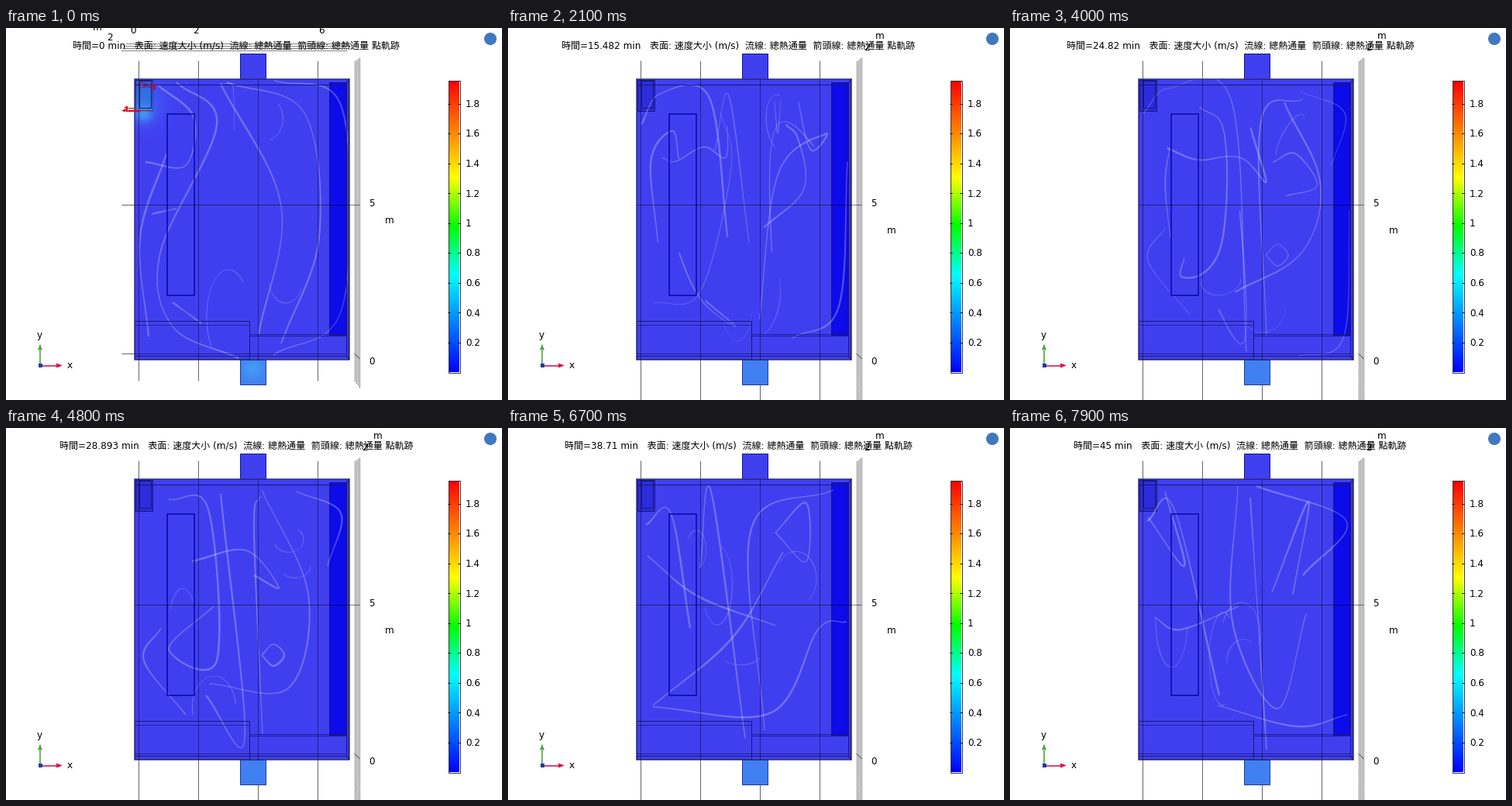
Animation of 640x480 px, one loop 8 s. Source, as a matplotlib script:

```python
import numpy as np
import matplotlib.pyplot as plt
from matplotlib.animation import FuncAnimation
from matplotlib.collections import PolyCollection
from matplotlib.patches import Rectangle, Circle

plt.rcParams["font.family"] = ["DejaVu Sans", "Noto Sans CJK JP"]
PX = 0.9  # points per pixel at 80 dpi
FRAMES, INTERVAL = 80, 100
SAMPLES = 90
NAVY, ROOM, GREY = "#16167c", "#403ff0", "#666666"
LEFT, TOP, RIGHT, BOTTOM = 165.5, 65.5, 443, 428
rng = np.random.default_rng(5)

fig = plt.figure(figsize=(8, 6), dpi=80, facecolor="white")
ax = fig.add_axes([0, 0, 1, 1])
ax.set_xlim(0, 640)
ax.set_ylim(480, 0)
ax.axis("off")


def line(x0, y0, x1, y1, color=NAVY, w=1, z=4, alpha=1):
    return ax.plot([x0, x1], [y0, y1], color=color, lw=w * PX, zorder=z,
                   alpha=alpha, solid_capstyle="butt")[0]


def box(x0, y0, x1, y1, face="none", edge="none", w=1, z=1):
    return ax.add_patch(Rectangle((x0, y0), x1 - x0, y1 - y0, facecolor=face,
                                  edgecolor=edge, lw=w * PX, zorder=z))


def label(x, y, text, ha="center"):
    return ax.text(x, y, text, ha=ha, va="baseline", color="black",
                   fontsize=12 * PX, zorder=8)


def arrow(x, y, dx, dy, color, w=1, head=5, half=2):
    d = np.array([dx, dy]) / np.hypot(dx, dy)
    n = half * np.array([-d[1], d[0]])
    tip = np.array([x + dx, y + dy])
    base = tip - head * d
    cap = plt.Polygon([tip, base + n, base - n], color=color, lw=0, zorder=7)
    return [line(x, y, *base, color, w, 7), ax.add_patch(cap)]


def spline(*flat):
    p = np.reshape(np.array(flat, float), (-1, 2))
    q = np.vstack([2 * p[0] - p[1], p, 2 * p[-1] - p[-2]])
    u = np.linspace(0, len(p) - 1, SAMPLES)
    i = np.minimum(u.astype(int), len(p) - 2)
    t = (u - i)[:, None]
    a, b, c, d = q[i], q[i + 1], q[i + 2], q[i + 3]
    return b + 0.5 * ((c - a) * t + (2 * a - 5 * b + 4 * c - d) * t**2
                      + (3 * b - a - 3 * c + d) * t**3)


def faint_arc():
    """A loose piece of an eddy somewhere in the room."""
    centre = rng.uniform((200, 100), (400, 380))
    radii = rng.uniform(12, (30, 70))
    start, sweep = rng.uniform(0, 2 * np.pi), rng.uniform(2, 4)
    a = start + np.linspace(0, sweep, SAMPLES)
    p = centre + radii * np.column_stack([np.cos(a), np.sin(a)])
    return p.clip((LEFT + 5, TOP + 6), (RIGHT - 6, BOTTOM - 6))


flows = []


def flow(frame, minutes, *curves):
    """Streamlines at one moment, each curve given by a few x, y pairs."""
    strong = [(2.5 - 0.15 * (k % 5), c) for k, c in enumerate(curves)]
    weak = [(0.9, faint_arc()) for _ in range(4)]
    flows.append((frame, minutes, strong + weak))


flow(0, 0,
     spline(195, 73, 242, 115, 232, 177, 180, 173),
     spline(220, 70, 272, 125, 199, 290, 215, 385, 300, 426),
     spline(277, 72, 355, 230, 326, 395),
     spline(285, 70, 385, 110, 404, 270, 355, 407),
     spline(345, 67, 434, 105, 434, 360, 345, 422),
     spline(207, 162, 173, 270, 184, 398),
     spline(188, 240, 220, 233),
     spline(215, 354, 252, 381))

flow(12, 10.783,
     spline(186, 255, 184, 130, 240, 115, 255, 225),
     spline(172, 135, 190, 90, 240, 86, 267, 158),
     spline(267, 158, 285, 88, 311, 277),
     spline(331, 395, 334, 120, 412, 85, 385, 160, 375, 85),
     spline(386, 98, 375, 175, 335, 263),
     spline(438, 125, 424, 330, 365, 382),
     spline(196, 295, 240, 350, 299, 405, 222, 394),
     spline(344, 95, 348, 135, 352, 93))

flow(21, 15.482)
flows.pop()

flow(33, 21.256,
     spline(170, 140, 205, 182, 270, 158, 314, 190, 302, 75),
     spline(172, 110, 205, 78, 286, 95, 305, 418),
     spline(174, 95, 178, 190, 203, 305),
     spline(187, 355, 248, 340, 288, 180, 275, 110),
     spline(331, 400, 326, 120, 420, 95),
     spline(322, 160, 365, 135, 405, 215, 324, 250),
     spline(316, 350, 408, 205, 375, 110),
     spline(438, 235, 430, 400, 370, 424))

flow(48, 28.893,
     spline(210, 92, 261, 105, 272, 300, 210, 285, 268, 230),
     spline(240, 172, 310, 158, 352, 206, 320, 190),
     spline(277, 85, 308, 400, 258, 345),
     spline(331, 395, 320, 130, 328, 88),
     spline(330, 80, 390, 215, 365, 335, 262, 330),
     spline(330, 293, 345, 279, 359, 293, 345, 307, 330, 293),
     spline(375, 82, 432, 110, 415, 178),
     spline(200, 258, 178, 300, 232, 370))

flow(67, 38.71,
     spline(180, 165, 245, 217, 345, 255),
     spline(178, 125, 210, 110, 235, 258),
     spline(248, 180, 262, 82, 306, 400),
     spline(331, 390, 314, 130, 420, 80),
     spline(345, 135, 385, 172, 385, 97, 345, 135),
     spline(355, 160, 290, 270, 187, 358),
     spline(187, 360, 340, 367, 400, 260, 437, 250))

flow(79, 45,
     spline(178, 115, 225, 178, 200, 82),
     spline(177, 120, 212, 105, 270, 345),
     spline(187, 245, 220, 260, 295, 230),
     spline(294, 75, 287, 250, 345, 362, 382, 240),
     spline(310, 90, 331, 415),
     spline(338, 212, 385, 95, 365, 215),
     spline(318, 75, 434, 120, 378, 190),
     spline(268, 358, 370, 385, 435, 370))


def pair_curves(first, second):
    """Match nearest curves; unmatched ones shrink away or grow in."""
    options = sorted((np.hypot(*(p - q[::s]).T).mean(), i, j, s)
                     for i, (_, p) in enumerate(first)
                     for j, (_, q) in enumerate(second) for s in (1, -1))
    pairs, left, right = [], set(range(len(first))), set(range(len(second)))
    for gap, i, j, s in options:
        if gap < 90 and i in left and j in right:
            left.remove(i)
            right.remove(j)
            pairs.append((*first[i], second[j][0], second[j][1][::s]))
    pairs += [(*first[i], 0, first[i][1]) for i in sorted(left)]
    pairs += [(0, second[j][1], *second[j]) for j in sorted(right)]
    return pairs


stages = [(a[0], b[0], pair_curves(a[2], b[2])) for a, b in zip(flows, flows[1:])]


def ribbon(p, width):
    d = np.gradient(p, axis=0)
    d /= np.hypot(*d.T)[:, None] + 1e-6
    s = np.linspace(0, 1, SAMPLES)
    half = width / 2 * (0.8 + 0.25 * np.sin(7 * s + p[0, 0]))
    n = np.column_stack([-d[:, 1], d[:, 0]]) * half[:, None]
    return np.vstack([p + n, (p - n)[::-1]])


# Room, panels and openings
box(LEFT, TOP, RIGHT, BOTTOM, ROOM)
box(302, 33, 334.5, TOP, ROOM, NAVY)
box(302, BOTTOM, 334.5, 460, "#4080f2", "#1c3c8c")
box(416.5, 70, 438, 396, "#0d0bea", NAVY, z=2)
unit = box(166.5, 66.5, 189, 107, "#2c2cdc", NAVY, z=2)
box(171.5, 67.5, 187, 102.5, edge=NAVY, z=4)
box(208, 110.5, 243, 344.5, edge="#0a0aa8", w=1.6, z=4)
box(LEFT, 377.5, 313.5, 427, edge=NAVY, z=4)
line(167, 382.5, 313, 382.5, alpha=0.7)
for y in (394.5, 396.5):
    line(313.5, y, 438, y, alpha=0.8)
box(LEFT, TOP, RIGHT, BOTTOM, edge="#30307c", w=1.5, z=4)
line(441.5, TOP, 441.5, BOTTOM, "#2a2a96", 2, alpha=0.7)
line(LEFT, 72.5, 438.5, 72.5)
line(LEFT, 422.5, 438.5, 422.5)
line(438.5, 70, 438.5, 422.5)
line(RIGHT, TOP, 438.5, 72.5)
line(RIGHT, BOTTOM, 438.5, 422.5)

# Axis grid, which differs between the first view and the later one
start_only, later = [], []
for x in 170.5 + 77 * np.arange(4):
    line(x, TOP, x, BOTTOM, "black", alpha=0.45)
    line(x, 42, x, TOP, GREY, z=0)
    start_only.append(line(x, BOTTOM, x, 455, GREY, z=0))
    later.append(line(x, BOTTOM, x, 480, GREY, z=0))
for y, end in ((227.5, 456), (419.5, 438)):
    line(LEFT, y, end, y, "black", alpha=0.48)
    start_only.append(line(149, y, LEFT, y, GREY, z=0))
for k in range(4):
    x, low = 449.5 + 2.3 * k, 456 + 2.5 * k
    line(x, 42 - 1.5 * k, x, low, GREY, z=0, alpha=0.8)
    later.append(line(x, low, x, 480, GREY, z=0, alpha=0.8))
    y = 28.5 - 3 * k
    start_only.append(line(148 + 2 * k, y, 440 + 2 * k, y, GREY, z=0, alpha=0.8))
line(449.5, 420, 456.5, 427, GREY, z=0)

start_only += [label(118, 3, "m"), label(134, 16, "2"), label(495, 252, "m")]
start_only += [label(164 + 81 * k, 7, str(2 * k)) for k in (0, 1, 3)]
later += [label(480, 14, "m"), label(463, 29, "2"), label(495, 265, "m")]
label(472, 230, "5")
label(472, 434, "0")


def glow(x, y, radius, strength, left, top, right, bottom):
    gy, gx = np.mgrid[top:bottom, left:right]
    rgba = np.ones(gx.shape + (4,)) * (0.27, 0.68, 0.97, 0)
    rgba[..., 3] = strength * np.exp(-((gx - x)**2 + (gy - y)**2) / radius**2)
    return ax.imshow(rgba, extent=(left, right, bottom, top), aspect="auto",
                     zorder=2.5)


# Jet and arrows at the start
start_only += [glow(177, 110, 11, 0.75, 166, 66, 225, 145),
               glow(177, 95, 26, 0.3, 166, 66, 225, 145),
               glow(318, 438, 14, 0.6, 303, 429, 334, 460)]
for x, y, dx in ((168, 102.5, -16), (173, 106.5, -24), (187, 105.5, -35)):
    start_only += arrow(x, y, dx, 0, "#e00010")
for y, dy in ((69, 7), (72, 7), (78, -5)):
    start_only += arrow(170, y, 24, dy, "#a01048")

# Colour bar
t = np.linspace(1, 0, 376)
stops = [0, 1 / 3, 0.5, 2 / 3, 1]
bar = np.column_stack([np.interp(t, stops, c) for c in
                       ([0, 0, 0, 1, 1], [0, 1, 1, 1, 0], [1, 1, 0, 0, 0])])
ax.imshow(bar[:, None], extent=(571, 585, 444, 68), aspect="auto", zorder=2)
box(570.5, 67.5, 585.5, 444.5, edge="#333333", z=3)
for k in range(1, 10):
    y = 444 - 38.5 * k
    for x in (570, 583):
        line(x, y, x + 3, y, "black")
    label(593, y + 4.5, f"{0.2 * k:.2g}", "left")

# Axis triad and badge
arrow(44, 435.5, 0, -28, "#4aa83c", 1.6, 8, 3)
arrow(44, 435.5, 29, 0, "#dc1450", 1.6, 8, 3)
box(41.5, 433, 46.5, 438, "#1c3c9c", z=8)
label(43.5, 400, "y")
label(82, 439, "x")
ax.add_patch(Circle((625, 14), 8, color="#3f78c0", lw=0, zorder=5))

streams = PolyCollection([], facecolors="white", edgecolors="none",
                         alpha=0.27, zorder=3)
ax.add_collection(streams, autolim=False)
title = label(297, 26, "")
clock_frames = [0, 12, 21, 33, 48, 67, 79]
clock_minutes = [0, 10.783, 15.482, 21.256, 28.893, 38.71, 45]


def draw(frame):
    begin, end, pairs = next(s for s in stages if frame <= s[1])
    k = (frame - begin) / (end - begin)
    mixed = [(p + (q - p) * k, v + (w - v) * k) for v, p, w, q in pairs]
    streams.set_verts([ribbon(p, w) for p, w in mixed if w > 0.05])
    minutes = np.interp(frame, clock_frames, clock_minutes)
    clock = f"{minutes:.3f}".rstrip("0").rstrip(".")
    title.set_text(f"時間={clock} min   表面: 速度大小 (m/s)  "
                   "流線: 總熱通量  箭頭線: 總熱通量 點軌跡")
    for item in start_only:
        item.set_visible(frame == 0)
    for item in later:
        item.set_visible(frame > 0)
    unit.set_facecolor("#2c2cdc" if frame else "#2a5cdc")
    return [streams, title]


anim = FuncAnimation(fig, draw, frames=FRAMES, interval=INTERVAL,
                     repeat=True, repeat_delay=0, blit=False)
plt.show()
```
